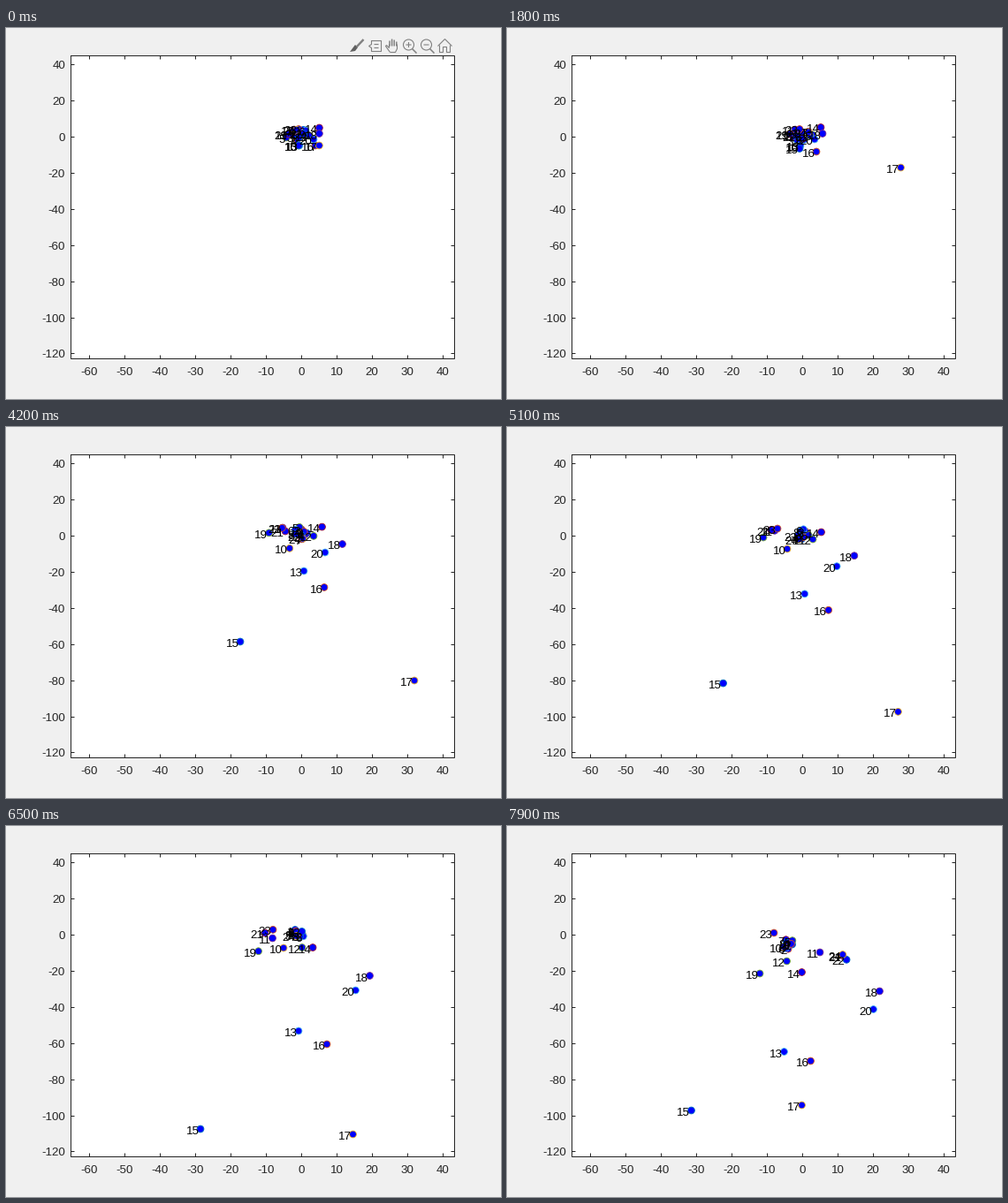
A matplotlib script for the animation above (8 s loop, 560 by 420 pixels).

```python
import numpy as np
import matplotlib.pyplot as plt
from matplotlib.animation import FuncAnimation
from matplotlib.patches import Circle, Polygon, Rectangle

W, H, DPI = 560, 420, 100
PX = 72 / DPI
FRAMES, STEP = 80, 100
INK, GRAY = "#262626", "#808080"
CYCLE = ["#0072BD", "#D95319", "#EDB120", "#7E2F8E", "#77AC30", "#4DBEEE", "#A2142F"]
L, R, T, B = 73, 507, 31, 374
OX, OY, SX, SY = 334.4, 123, 4, 2.045    # data origin and pixels per unit
N = 24

plt.rcParams["font.family"] = "Liberation Sans"
FONT = 13.33 * PX
rng = np.random.default_rng(5)
times = np.arange(FRAMES) * STEP / 1000

# A few key points per body that leaves the swarm, at these seconds.
WIDE_T, RING_T = (1.8, 4.2, 6.5, 7.9), (1.8, 5.1, 7.9)
WIDE = {
    11: [(326, 115), (313, 114), (301.5, 127), (354, 143)],
    13: [(332, 133), (337, 163), (331, 232), (313.5, 255.5)],
    15: [(331, 136.5), (265, 243), (220, 343), (208.5, 322)],
    16: [(350, 140), (360, 181.5), (363, 247), (343.5, 266)],
    17: [(445.5, 158), (462, 287), (392.5, 349), (333.5, 316)],
    18: [(357, 119.5), (380.5, 132.5), (411.5, 169.5), (421.5, 187)],
    20: [(348, 126), (361, 142), (395.5, 186), (414.5, 207.5)],
    21: [(320, 120), (316, 118), (293, 121), (380, 147)],
}
RING = {
    10: [(331.5, 134), (317, 138), (313, 137)],
    12: [(343, 122), (346, 127), (316.5, 153)],
    14: [(355, 112.5), (355.5, 119), (333.5, 165.5)],
    19: [(320, 119.5), (290, 125), (286, 167)],
    23: [(331, 114.5), (306, 115), (302, 121)],
}


def ease(t, start, end):
    u = np.clip((t - start) / (end - start), 0, 1)
    return u * u * (3 - 2 * u)


def journey(knots, points):
    """Wait inside the starting square, then follow a smooth path."""
    home = np.clip(points[0], (OX - 20, OY - 10), (OX + 20, OY + 10))
    s = np.array([0, 1, *knots])
    p = np.array([home, home, *points], float)
    m = np.gradient(p, s, axis=0, edge_order=2)
    i = np.clip(np.searchsorted(s, times, side="right") - 1, 0, len(s) - 2)
    h = (s[i + 1] - s[i])[:, None]
    u = (times - s[i])[:, None] / h
    return ((1 + 2 * u) * (1 - u) ** 2 * p[i] + u * (1 - u) ** 2 * h * m[i]
            + u * u * (3 - 2 * u) * p[i + 1] + u * u * (u - 1) * h * m[i + 1])


def swarm(n):
    """Seeded elliptic orbit in a swarm that shrinks and finally sinks."""
    phase = rng.uniform(0, 2 * np.pi) + times * rng.uniform(0.7, 2)
    reach = np.sqrt(rng.uniform(0.1, 1))
    x = 332 + reach * (17 - 1.4 * times) * np.cos(phase)
    y = 121 + reach * 8 * np.sin(phase)
    sink = ease(times, 6.3, 8)
    dx, dy = (52, 28) if n in (22, 24) else (-14, 13)    # two get flung out
    return np.column_stack([x + dx * sink, y + dy * sink])


def path(n):
    if n in WIDE:
        return journey(WIDE_T, WIDE[n])
    if n in RING:
        return journey(RING_T, RING[n])
    return swarm(n)


paths = np.array([path(n) for n in range(1, N + 1)])

fig = plt.figure(figsize=(W / DPI, H / DPI), dpi=DPI, facecolor="#f0f0f0")
ax = fig.add_axes([0, 0, 1, 1])
ax.set_xlim(0, W)
ax.set_ylim(H, 0)
ax.axis("off")


def line(xs, ys, color=INK, width=1.0):
    """Polyline through pixel centres."""
    return ax.plot(np.add(xs, 0.5), np.add(ys, 0.5), color=color, lw=width * PX,
                   snap=False, solid_joinstyle="miter", solid_capstyle="butt")[0]


def tick_label(x, y, value, ha):
    ax.text(x, y, str(value), size=FONT, color=INK, ha=ha, va="baseline")


def draw_axes():
    ax.add_patch(Rectangle((L, T), R - L, B - T, fc="white", ec="none", zorder=0))
    line([L, R, R, L, L], [T, T, B, B, T])
    for v in range(-60, 41, 10):
        x = round(OX + SX * v)
        line([x, x], [B, B - 4])
        line([x, x], [T, T + 4])
        tick_label(x + 0.2, 393, v, "center")
    for v in range(-120, 41, 20):
        y = round(OY - SY * v)
        line([L, L + 4], [y, y])
        line([R, R - 4], [y, y])
        tick_label(67, y + 5, v, "right")


def draw_toolbar():
    parts = []

    def stroke(xs, ys, width=1.1):
        parts.append(line(xs, ys, GRAY, width))

    def shape(patch):
        parts.append(ax.add_patch(patch))

    # brush
    stroke([404, 396], [12.5, 21], 2.4)
    shape(Polygon([(395, 19), (398, 22), (395, 26), (389, 27), (392, 23)],
                  fc="#606060", ec="none"))
    # data tip
    stroke([413, 424, 424, 413, 413, 410, 413, 413], [14, 14, 26, 26, 22, 20, 18, 14])
    for y in (18, 22):
        stroke([416, 421], [y, y])
    # hand: four fingers over a palm
    for k, top in enumerate((14, 12, 13, 15)):
        stroke([433.5 + 2.6 * k] * 2, [top, 20], 1.5)
    stroke([434, 429, 430, 433, 433], [27, 20, 19, 22, 18])
    stroke([442, 442, 440, 434], [18, 23, 27, 27])
    # magnifiers
    for x in (455, 475):
        shape(Circle((x + 0.5, 19), 6, fc="none", ec=GRAY, lw=1.1 * PX))
        stroke([x + 4, x + 9], [23, 28], 1.5)
        stroke([x - 3, x + 3], [18.5, 18.5])
    stroke([455, 455], [15.5, 21.5])
    # house
    stroke([488, 496, 504], [20, 12, 20])
    stroke([490, 490, 494, 494, 498, 498, 502, 502],
           [19, 27, 27, 21, 21, 27, 27, 19])
    return parts


draw_axes()
toolbar = draw_toolbar()
dots = ax.scatter(*paths[:, 0].T, s=(7.8 * PX) ** 2, c="#0000ff",
                  edgecolors=[CYCLE[i % 7] for i in range(N)],
                  linewidths=0.8 * PX, zorder=3)
labels = [ax.text(0, 0, str(n), size=FONT, color="black", ha="right", va="baseline",
                  zorder=4) for n in range(1, N + 1)]


def update(i):
    pos = paths[:, i]
    dots.set_offsets(pos)
    for label, (x, y) in zip(labels, pos):
        label.set_position((x - 1.5, y + 6))
    for part in toolbar:
        part.set_visible(i == 0)
    return [dots, *labels, *toolbar]


anim = FuncAnimation(fig, update, frames=FRAMES, interval=STEP, repeat=True,
                     repeat_delay=0, blit=False)
plt.show()
```
